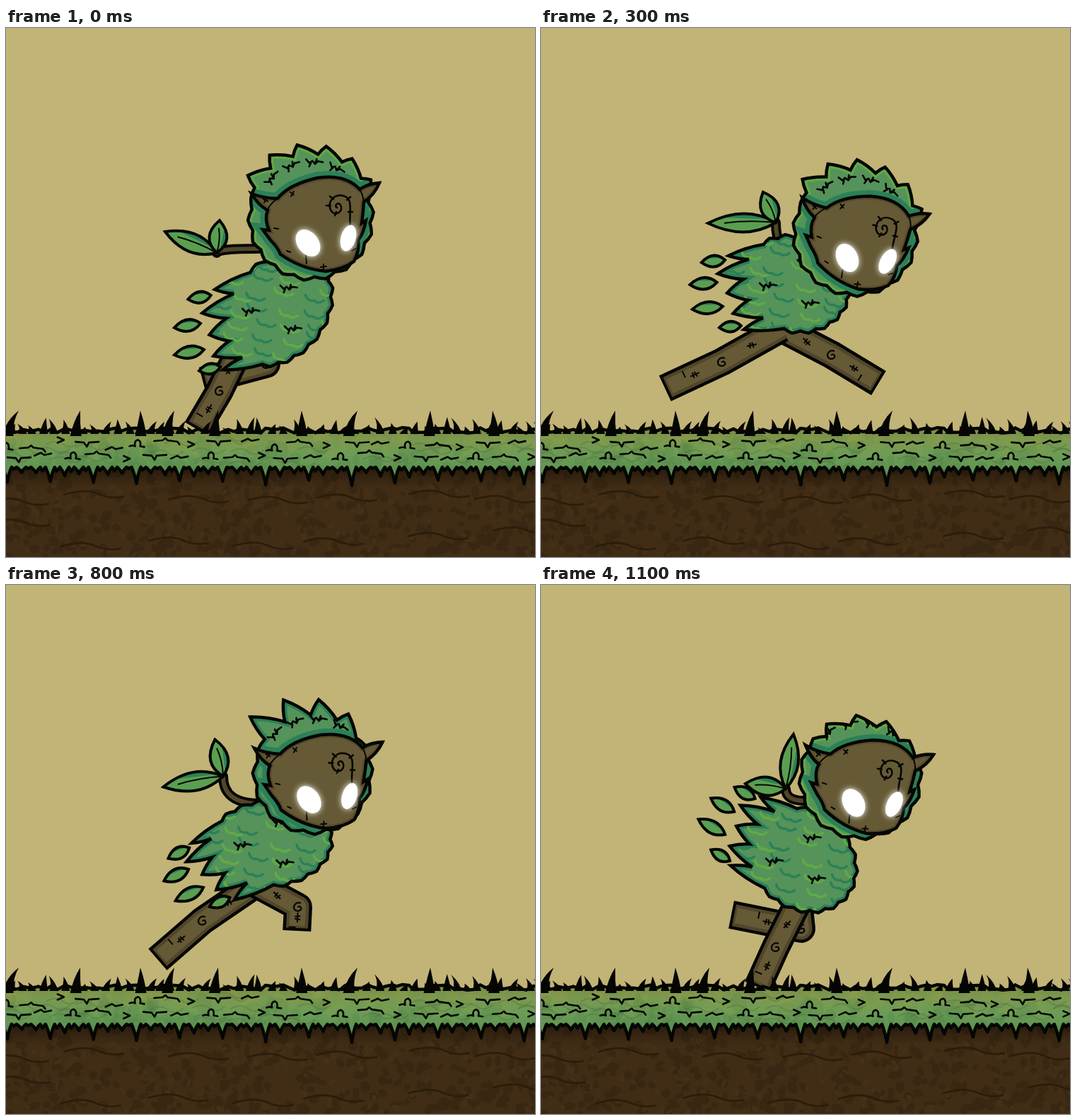
An HTML page with a canvas that plays this animation: 748 by 748 pixels, repeating every 1.2 s.

```html
<!DOCTYPE html>
<html>
<head>
<meta charset="utf-8">
<style>
html, body { margin: 0; height: 100%; overflow: hidden; background: #c2b377; }
canvas { display: block; width: 100vw; height: 100vh; }
</style>
</head>
<body>
<canvas id="stage" width="748" height="748"></canvas>
<script>
const SIZE = 748, STEP = 100, RAD = Math.PI / 180;
const INK = '#050603', GREEN = '#55935a', TEAL = '#2c8058', LIME = '#62a947', BARK = '#655a35', DARK_BARK = '#51462a';
const stage = document.getElementById('stage').getContext('2d');
let g = stage, seed = 1;

const rnd = () => (seed = seed * 16807 % 2147483647) / 2147483647;
const between = (a, b) => a + (b - a) * rnd();

function stroke(path, color, width) {
  g.strokeStyle = color;
  g.lineWidth = width;
  g.stroke(path);
}
function fill(path, color) {
  g.fillStyle = color;
  g.fill(path);
}
function clipped(path, draw) {
  g.save();
  g.clip(path);
  draw();
  g.restore();
}
function at(x, y, draw, angle = 0) {
  g.save();
  g.translate(x, y);
  g.rotate(angle);
  draw();
  g.restore();
}
function ellipse(x, y, rx, ry, angle) {
  const path = new Path2D();
  path.ellipse(x, y, rx, ry, angle, 0, 7);
  return path;
}

// Point on a tilted oval, by angle in degrees
const oval = (cx, cy, rx, ry = rx, tilt = 0) => angle => {
  const u = rx * Math.cos((angle - tilt) * RAD), v = ry * Math.sin((angle - tilt) * RAD);
  const c = Math.cos(tilt * RAD), s = Math.sin(tilt * RAD);
  return [cx + u * c - v * s, cy + u * s + v * c];
};

// Zigzag of n teeth along an arc; tip(angle, progress) places each point
function teeth(base, from, to, n, peak, tip) {
  const points = [], size = (to - from) / n;
  for (let i = 0; i < n; i++) {
    const a = from + i * size;
    points.push(base(a), tip(a + size * peak, i / n));
  }
  return points;
}

// Closed clockwise shape with edges bowed outward
function blob(points, bow) {
  const path = new Path2D();
  points.forEach(([x, y], i) => {
    const [u, v] = points[(i + 1) % points.length];
    if (!i) path.moveTo(x, y);
    path.quadraticCurveTo((x + u) / 2 + (v - y) * bow, (y + v) / 2 - (u - x) * bow, u, v);
  });
  path.closePath();
  return path;
}

/* ---------- ground ---------- */

const TALL = [18, 105, 190, 238, 300, 418, 497, 600, 688];
const marks = ['M-11 4q5-2 8 0q-2-8 4-9q5 2 3 9l6 1', 'M-16-1l12 1 4 6 3-6 14-1', 'M-17 0l12-1 4-3 3 3 14 2 3 4', 'M-12 2l9-4 5 3 10-2', 'M-5-4l9 4-9 4'];

function blade(x, y, height, lean, width) {
  fill(new Path2D(`M${x - width} ${y}Q${x - width * .4} ${y - height * .6} ${x + lean} ${y - height}Q${x + width * .7} ${y - height * .5} ${x + width} ${y}z`), INK);
}

function spots(count, color, y0, y1, r) {
  for (let i = 0; i < count; i++)
    fill(ellipse(between(0, SIZE), between(y0, y1), between(r / 3, r), between(r / 4, r * .7), between(0, 3)), color);
}

function grassShape() {
  const path = new Path2D();
  for (let x = -10; x < 765; x += between(6, 11)) path.lineTo(x, between(565, 573));
  // Every third root hangs low
  for (let i = 37, x = 753; i > -2; i--, x -= 20.3) {
    const depth = i % 3 ? between(7, 14) : between(18, 27), y = 621;
    path.lineTo(x + 9, y + between(1, 6));
    path.lineTo(x + 6, y);
    path.quadraticCurveTo(x + 2, y + depth * .4, x, y + depth);
    path.quadraticCurveTo(x - 3, y + depth * .4, x - 7, y);
  }
  path.closePath();
  return path;
}

function makeGround() {
  const canvas = document.createElement('canvas');
  canvas.width = canvas.height = SIZE;
  g = canvas.getContext('2d');
  g.lineCap = g.lineJoin = 'round';
  seed = 77;
  g.fillStyle = '#412d15';
  g.fillRect(0, 618, SIZE, 130);
  spots(380, '#382712', 625, SIZE, 10);
  spots(130, '#443017', 640, SIZE, 7);
  const shade = g.createLinearGradient(0, 622, 0, 650);
  shade.addColorStop(0, 'rgba(18,11,4,.5)');
  shade.addColorStop(1, 'rgba(18,11,4,0)');
  g.fillStyle = shade;
  g.fillRect(0, 618, SIZE, 40);
  for (let i = 0; i < 14; i++)
    at(i % 7 * 115 + between(0, 40), i < 7 ? between(655, 675) : between(690, 735),
      () => stroke(new Path2D('M-40 0Q-10-9 8-1T44 3'), '#2c1d0a', 2.8));

  const grass = grassShape(), tone = g.createLinearGradient(0, 565, 0, 645);
  ['#7d8a45', '#78994f', '#6b9c56', '#5f9551', '#4e7f43'].forEach((c, i) => tone.addColorStop(i / 4, c));
  fill(grass, tone);
  clipped(grass, () => {
    spots(60, 'rgba(150,160,75,.16)', 572, 600, 18);
    spots(70, 'rgba(65,115,65,.15)', 592, 628, 17);
    for (let i = 0; i < 32; i++)
      at(between(0, SIZE), between(580, 617), () => stroke(new Path2D('M-22 0Q-8-8 2 0T24-2'), 'rgba(80,108,55,.35)', 2));
  });
  stroke(grass, INK, 4.5);
  for (let x = -5; x < 755; x += between(11, 20)) blade(x, 574, between(9, 24), between(-9, 9), 6);
  for (const x of TALL) {
    const lean = between(-4, 16);
    blade(x - lean, 577, 36, lean, 8);
  }
  for (let i = 0; i < 40; i++)
    at(i * 19 + between(-5, 5), i % 2 ? between(601, 609) : between(582, 595), () => stroke(new Path2D(marks[i % 5]), INK, 2.6));
  g = stage;
  return canvas;
}

/* ---------- poses ---------- */

// head: left eye x, y, turn   body: x, y, radii, tilt, wind angle
// near, far: knee x, y, foot x, y   twig: fork x, y, two leaf tips
const stand = {
  hood: 0, head: [427, 304, 0], body: [385, 398, 85, 65, 130, 165], hip: [330, 455],
  near: [302, 513, 272, 564], far: [368, 475, 282, 498], twig: [298, 318, 225, 288, 302, 272]
};
const push = {
  hood: 1, head: [407, 296, -8], body: [370, 383, 95, 52, 150, 130], hip: [350, 435],
  near: [278, 488, 226, 560], far: [427, 449, 366, 484], twig: [283, 296, 228, 268, 233, 365]
};
const leap = {
  hood: 0, head: [433, 325, 12], body: [360, 362, 75, 65, 200, 170], hip: [340, 425],
  near: [256, 472, 179, 508], far: [411, 462, 474, 500], twig: [332, 275, 236, 276, 314, 232]
};
const land = {
  hood: 2, head: [423, 308, 9], body: [350, 388, 80, 66, 220, 205], hip: [345, 448],
  near: [332, 490, 236, 469], far: [330, 510, 307, 565], twig: [345, 290, 289, 270, 368, 217]
};

// The second stride repeats the first, moved, with the legs swapped
function swapped(pose, dx, dy, changes) {
  const move = (list, count = list.length) => list.map((v, i) => i < count ? v + (i % 2 ? dy : dx) : v);
  return {
    hood: pose.hood, head: move(pose.head, 2), body: move(pose.body, 2), hip: move(pose.hip),
    near: move(pose.far), far: move(pose.near), twig: move(pose.twig), ...changes
  };
}
function tween(p, q) {
  const out = { hood: p.hood };
  for (const k in p) if (k !== 'hood') out[k] = p[k].map((v, i) => (v + q[k][i]) / 2);
  return out;
}
const push2 = swapped(push, 14, 6, { near: [412, 468, 346, 490], far: [297, 497, 253, 566], twig: [290, 303, 213, 338, 273, 247] });
const leap2 = swapped(leap, 3, -20, { twig: [324, 238, 232, 233, 318, 190] });
const land2 = swapped(land, 19, 0, { near: [332, 512, 308, 565], far: [368, 486, 273, 467], twig: [346, 288, 289, 281, 357, 211] });
const cycle = [
  stand, push, tween(push, leap), leap, tween(leap, land), land,
  swapped(stand, -3, 2), push2, tween(push2, leap2), leap2, tween(leap2, land2), land2
];

/* ---------- runner ---------- */

// Crest arc with tall teeth, then short fuzz around the rest
function makeHood(from, to, n, high, low, top, rest) {
  const ring = r => oval(431, 268, r);
  return blob([
    ...teeth(ring(top), from, to, n, .25, (a, t) => ring(top + high + (low - high) * t)(a)),
    ...teeth(ring(rest), to, from + 360, 11, .5, a => ring(rest + 5)(a))
  ], .08);
}
const hoods = [makeHood(208, 345, 6, 17, 9, 90, 84), makeHood(214, 318, 4, 36, 8, 84, 80), makeHood(222, 335, 4, 14, 10, 76, 82)];

const face = new Path2D('M347 234Q364 241 384 241Q400 221 440 212Q480 206 500 228Q512 220 528 219Q521 236 506 246Q505 262 503 276L509 272Q506 290 498 300Q500 316 492 330Q478 341 452 344Q418 341 388 320Q384 310 374 300L363 285 372 286Q365 270 370 258Q356 250 347 234z');
const swirl = new Path2D('M487 280C484 262 493 240 476 237C460 234 452 252 462 261C470 266 478 256 472 249C468 246 464 252 468 254M458 238l5 4M453 251l6 0M482 243l5-4M484 260l6 0M467 260l-2 5');
const scratches = new Path2D('M384 241Q375 247 369 258M500 228Q505 236 506 246M424 321l1 12M449 343l0-9m-4 4l8-1M402 232l5 4m0-5l-4 7M364 242l6 3m-1-4l-4 6M379 283l6 1M397 315l5 2M494 312l-5 3');
const nick = new Path2D('M-11-4l5 5 4-3 4 4 4-4 7 1M-4 1l-2 5M2 2l2-7');
const stitch = new Path2D('M-7 0L7 0M-2-4l1 8M3-4l-1 8');
const knot = new Path2D('M4-5C-3-8-8-1-5 4C-1 8 6 5 4 1C3-1 0-1 0 1');
const hatch = new Path2D('M0-5L0 5');

function leaf(x1, y1, x2, y2, w) {
  at(x1, y1, () => {
    const len = Math.hypot(x2 - x1, y2 - y1);
    const shape = new Path2D(`M0 0Q${len * .45} ${w} ${len} 0Q${len * .45} ${-w} 0 0z`);
    fill(shape, TEAL);
    clipped(shape, () => stroke(new Path2D(`M0 ${-w * .2}L${len} 0`), '#5a9f50', w * .7));
    if (len > 45 && w > 17) stroke(new Path2D(`M0 0Q${len * .4} 4 ${len * .75} 0`), INK, 2);
    stroke(shape, INK, 4);
  }, Math.atan2(y2 - y1, x2 - x1));
}

function leg([hx, hy], [kx, ky, fx, fy]) {
  const shin = Math.atan2(fy - ky, fx - kx), thigh = Math.atan2(ky - hy, kx - hx);
  const bone = extra => new Path2D(`M${hx} ${hy}L${kx} ${ky}L${fx + extra * Math.cos(shin)} ${fy + extra * Math.sin(shin)}`);
  g.lineCap = 'butt';
  g.lineJoin = 'round';
  stroke(bone(4), INK, 40);
  stroke(bone(0), DARK_BARK, 31);
  stroke(bone(-3), BARK, 22);
  at((hx + kx) / 2, (hy + ky) / 2, () => stroke(stitch, INK, 2), thigh + .3);
  at(kx, ky, () => stroke(knot, INK, 2.2));
  at((kx + fx) / 2, (ky + fy) / 2, () => {
    stroke(stitch, INK, 2);
    at(14, 7, () => stroke(hatch, INK, 2));
  }, shin);
  g.lineCap = 'round';
  g.lineJoin = 'miter';
}

function twig([x, y, turn], [fx, fy, ...tips]) {
  const c = Math.cos(turn * RAD), s = Math.sin(turn * RAD);
  const bx = x - 70 * c - 8 * s, by = y - 70 * s + 8 * c;
  const path = new Path2D(`M${bx} ${by}Q${fx} ${by} ${fx} ${fy}`);
  stroke(path, INK, 14);
  stroke(path, DARK_BARK, 6);
  leaf(fx, fy, tips[0], tips[1], 26);
  leaf(fx, fy, tips[2], tips[3], 25);
}

function torso([x, y, rx, ry, tilt, wind]) {
  const edge = oval(x, y, rx, ry, tilt), dx = Math.cos(wind * RAD), dy = Math.sin(wind * RAD);
  const blown = (a, far) => {
    const [u, v] = edge(a);
    return [u + dx * far, v + dy * far];
  };
  for (let i = 0; i < 4; i++) {
    const a = wind + (i - 1.5) * 30, size = 28 + i * 31 % 17;
    leaf(...blown(a, 38), ...blown(a + 3, 38 + size), 10 + size / 6);
  }
  const shape = blob([
    ...teeth(edge, wind - 65, wind + 65, 5, .5, (a, t) => blown(a, 33 + 9 * Math.cos(t * 9))),
    ...teeth(edge, wind + 65, wind + 295, 13, .5, a => oval(x, y, rx + 4, ry + 4, tilt)(a))
  ], .08);
  fill(shape, GREEN);
  clipped(shape, () => {
    stroke(shape, TEAL, 11);
    at(x, y, () => {
      seed = 41;
      for (let i = 0; i < 42; i++)
        at((i % 6 - 3) * 34 + between(0, 22), (Math.floor(i / 6) - 3) * 22 + between(-7, 7),
          () => stroke(new Path2D('M-13-3Q-9 6 0 3Q7 8 14 1'), i % 2 ? LIME : TEAL, 3.5), .15);
      for (const a of [60, 175, 290]) at(...oval(0, 0, 40, 32)(a), () => stroke(nick, INK, 2.6));
    });
  });
  stroke(shape, INK, 4.5);
}

function eye(x, y, rx, ry, angle) {
  g.shadowColor = '#fff';
  g.shadowBlur = 9;
  fill(ellipse(x, y, rx, ry, angle), '#fff');
  g.shadowBlur = 0;
}

function head([x, y, turn], hood) {
  at(x, y, () => {
    g.translate(-427, -304);
    const shape = hoods[hood];
    fill(shape, GREEN);
    clipped(shape, () => {
      stroke(shape, hood === 1 ? TEAL : LIME, 11);
      stroke(face, TEAL, 17);
      for (let a = 225; a < 320; a += 24)
        at(...oval(431, 268, 78)(a), () => stroke(a % 16 ? nick : hatch, a % 16 ? INK : LIME, 2.6), (a + 90) * RAD);
    });
    stroke(shape, INK, 4.5);
    fill(face, BARK);
    clipped(face, () => stroke(face, '#564b2c', 9));
    stroke(face, INK, 4.5);
    stroke(scratches, INK, 2);
    stroke(swirl, INK, 2.6);
    eye(427, 304, 15, 21, -.65);
    eye(484, 297, 10.5, 19, .27);
  }, turn * RAD);
}

function runner(pose) {
  leg(pose.hip, pose.far);
  leg(pose.hip, pose.near);
  twig(pose.head, pose.twig);
  torso(pose.body);
  head(pose.head, pose.hood);
}

const ground = makeGround();
stage.lineCap = 'round';
stage.miterLimit = 4;

function frame() {
  g.fillStyle = '#c2b377';
  g.fillRect(0, 0, SIZE, SIZE);
  runner(cycle[Math.floor(performance.now() / STEP) % cycle.length]);
  g.drawImage(ground, 0, 0);
  requestAnimationFrame(frame);
}
frame();
</script>
</body>
</html>
```
